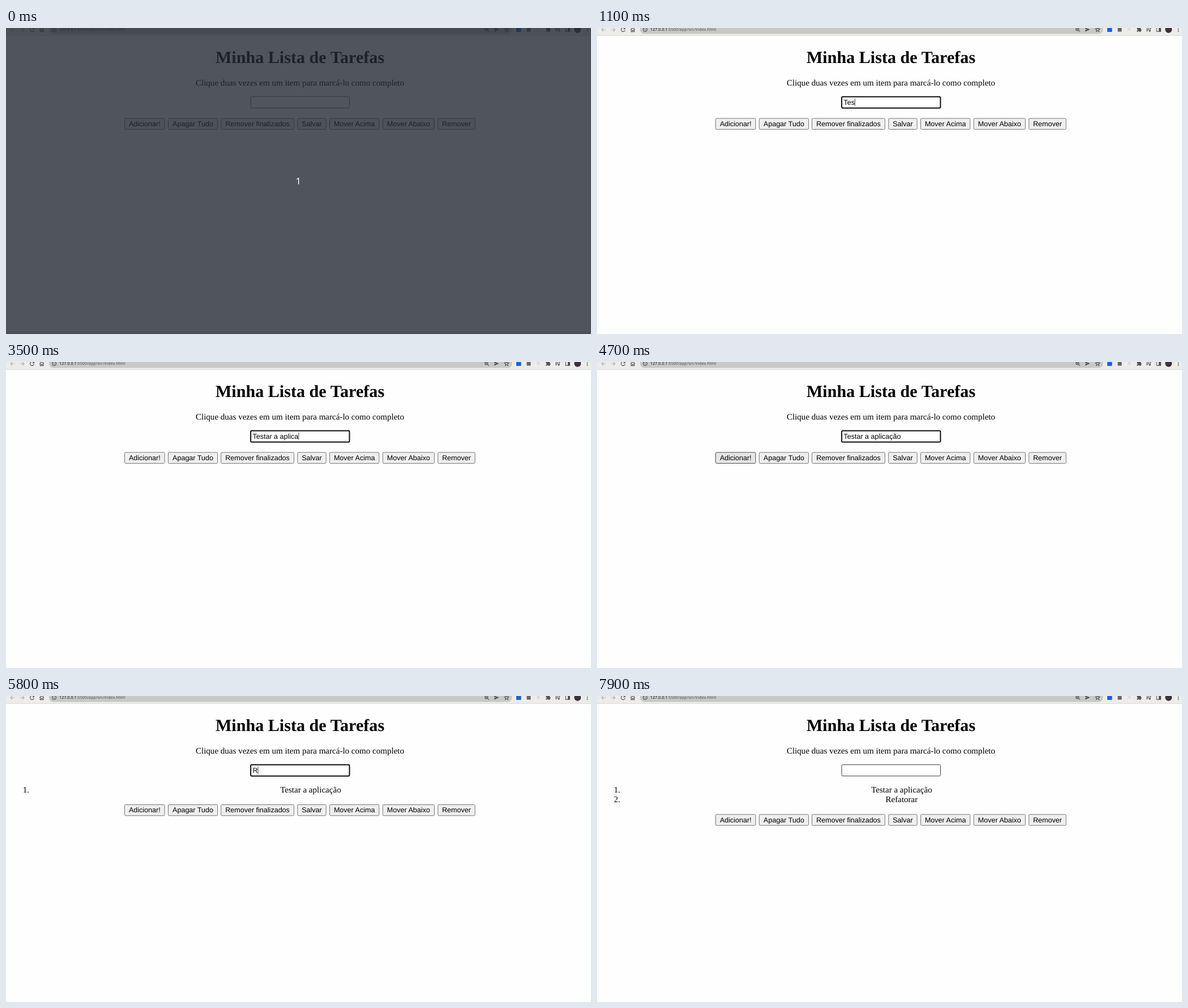
An HTML page for the animation above (8 s loop, 1033 by 542 pixels).

```html
<!DOCTYPE html>
<html lang="pt-BR">
<head>
<meta charset="utf-8">
<title>Minha Lista de Tarefas</title>
<style>
  html, body { margin: 0; width: 100%; height: 100%; overflow: hidden; background: #fefefe; }
  svg { display: block; }
  text { white-space: pre; text-rendering: geometricPrecision; }
  .serif { font: 15.065px "Liberation Serif", serif; }
  .title { font: bold 30.13px "Liberation Serif", serif; }
  .sans { font: 12.554px "Liberation Sans", sans-serif; }
  .url { font: 7.24px "Noto Sans", sans-serif; fill: #555; }
  .count { font: 16.5px "Noto Sans", sans-serif; fill: #fff; }
  .mid { text-anchor: middle; }
  .button rect { fill: #efefef; stroke: #767676; }
  .button.hover rect { fill: #e5e5e5; stroke: #4f4f4f; }
  .button.active rect { fill: #f5f5f5; stroke: #8d8d8d; }
  #field { fill: #fff; stroke: #767676; }
  #field.hover { stroke: #3c3c3c; }
  #field.focus { stroke: #101010; stroke-width: 2; }
  .icon { fill: none; stroke: #50524f; stroke-width: 1.1; }
  .pale { stroke: #b0b1ae; }
  .solid { fill: #50524f; stroke: none; }
</style>
</head>
<body>
<svg width="1033" height="542" viewBox="0 0 1033 542">
  <rect width="1033" height="542" fill="#fefefe"/>

  <g id="toolbar">
    <rect width="1033" height="13" fill="#ecedeb"/>
    <rect y="13" width="1033" height="1" fill="#dcdddb"/>
    <rect x="76" y="-10" width="817.5" height="20.5" rx="8" fill="#c7c9c5"/>
    <path class="icon pale" d="M15.5 3H8M11.5 -.5 8 3l3.5 3.5M24.5 3H32M28.5 -.5 32 3l-3.5 3.5"/>
    <path class="icon" d="M48.8 .7A3.5 3.5 0 1 0 49.4 4M49.5 -1V1.8H46.5"/>
    <path class="icon" d="M59.3 2.8 63.2 -.7l3.9 3.5M60.4 2V6.7h1.9V3.8h1.8v2.9H66V2"/>
    <circle class="icon" cx="85" cy="2.8" r="3.4" stroke-width=".8"/>
    <path class="icon" d="M85 2.2V4.8M85 .7V1.5" stroke-width=".9"/>
    <text class="url" x="94" y="5.4"><tspan fill="#1e1f1e">127.0.0.1</tspan>:5500/app/src/index.html</text>
    <circle class="icon" cx="848.3" cy="2.2" r="2.6" stroke-width=".9"/>
    <path class="icon" d="M850.2 4.1 853 6.9M847 2.2h2.6M848.3 .9v2.6" stroke-width=".9"/>
    <path class="solid" d="M862.3 -.8 870.5 2.8 862.3 6.4V3.6L867 2.8 862.3 2Z"/>
    <path class="icon" d="M884 -1 885.1 1.4 887.7 1.7 885.8 3.5 886.3 6.1 884 4.8 881.7 6.1 882.2 3.5 880.3 1.7 882.9 1.4Z" stroke-width=".9"/>
    <rect x="901" y="-2" width="8.6" height="9" rx="1" fill="#1b63d8"/>
    <rect x="919.5" y="-1" width="7" height="7.5" fill="#656765"/>
    <rect x="937.5" y="0" width="5" height="5" fill="#dddedc"/>
    <path class="solid" d="M953.5 0H956a1.3 1.3 0 0 1 2.6 0H960.4V2.2a1.3 1.3 0 0 1 0 2.6V6.8H957.8a1.2 1.2 0 0 0-2.4 0H953.5V4.6a1.2 1.2 0 0 0 0-2.4Z"/>
    <path class="icon" d="M970 .3h5.5M970 2.6h5.5M970 4.9h3M977 5V0h2"/>
    <circle class="solid" cx="976" cy="5.2" r="1.4"/>
    <rect class="icon" x="988.2" y="-.8" width="7.2" height="7"/>
    <rect class="solid" x="992" y="-.8" width="3.4" height="7"/>
    <circle cx="1009.3" cy="2.8" r="6" fill="#40303f"/>
    <g class="solid"><circle cx="1026.5" cy="0" r=".9"/><circle cx="1026.5" cy="3" r=".9"/><circle cx="1026.5" cy="6" r=".9"/></g>
  </g>

  <text class="title mid" x="519" y="61.8">Minha Lista de Tarefas</text>
  <text class="serif mid" x="519" y="102.3">Clique duas vezes em um item para marcá-lo como completo</text>
  <rect id="field" x="432.1" y="121.7" width="174.4" height="20" rx="2"/>
  <text id="typed" class="sans" x="435.4" y="135.6"></text>
  <rect id="caret" y="124.6" width=".7" height="13.2"/>
  <g id="list"></g>
  <g id="buttons"></g>

  <g id="countdown">
    <rect width="1033" height="542" fill="rgb(37,43,52)" fill-opacity=".8"/>
    <rect y="538" width="1033" height="4" fill="#000" fill-opacity=".06"/>
    <text class="count mid" x="516.3" y="276.9">1</text>
  </g>
</svg>
<script>
const LOOP = 8000;
const LINE = 17.3;
const LIST_GAP = 15.1;
const TASKS = ['Testar a aplicação', 'Refatorar'];
// label, left edge, right edge
const BUTTONS = [
  ['Adicionar!', 209.5, 280.1],
  ['Apagar Tudo', 286.4, 373.6],
  ['Remover finalizados', 379.6, 508.5],
  ['Salvar', 514.8, 565.2],
  ['Mover Acima', 571.5, 658.8],
  ['Mover Abaixo', 665.3, 756.4],
  ['Remover', 762.7, 828.2]
];

// Each step changes part of the state and holds until the next one.
const STEPS = [
  [0, { countdown: true, field: '', text: '', caret: false, button: '', tasks: 0 }],
  [100, { countdown: false, field: 'hover' }],
  [400, { field: 'focus', caret: true }],
  [700, { text: 'T' }],
  [900, { text: 'Te' }],
  ...typing(1100, 'Te', 'star a a'),
  [2000, { text: 'Testar a apl' }],
  [2200, { text: 'Testar a apli' }],
  [2300, { text: 'Testar a aplica' }],
  [2400, { text: 'Testar a aplica~' }],
  [2800, { text: 'Testar a ' }],
  ...typing(3000, 'Testar a ', 'aplicaç~'),
  [3800, { text: 'Testar a aplicaçã' }],
  [3900, { text: 'Testar a aplicação' }],
  [4600, { caret: false }],
  [4700, { button: 'hover' }],
  [5000, { button: 'active', field: '' }],
  [5100, { button: '', text: '', tasks: 1 }],
  [5400, { field: 'hover' }],
  [5600, { field: 'focus', caret: true }],
  [5800, { text: 'R' }],
  ...typing(6000, 'R', 'efat'),
  [6500, { text: 'Refato' }],
  [6600, { text: 'Refatora' }],
  [6700, { text: 'Refatorar' }],
  [7200, { button: 'hover' }],
  [7300, { caret: false }],
  [7500, { button: 'active', field: '' }],
  [7600, { button: '', text: '', tasks: 2 }],
  [7900, { field: 'hover' }]
];

function typing(start, before, added) {
  return [...added].map((_, i) => [start + i * 100, { text: before + added.slice(0, i + 1) }]);
}

const byId = id => document.getElementById(id);
const field = byId('field'), typed = byId('typed'), caret = byId('caret');
const list = byId('list'), buttons = byId('buttons'), countdown = byId('countdown');

function add(parent, tag, attrs, content = '') {
  const el = document.createElementNS(parent.namespaceURI, tag);
  for (const name in attrs) el.setAttribute(name, attrs[name]);
  el.textContent = content;
  return parent.appendChild(el);
}

for (const [label, left, right] of BUTTONS) {
  const group = add(buttons, 'g', { class: 'button' });
  add(group, 'rect', { x: left, y: 160.1, width: right - left, height: 19.4, rx: 1.8 });
  add(group, 'text', { class: 'sans mid', x: (left + right) / 2, y: 174 }, label);
}

TASKS.forEach((task, i) => {
  const item = add(list, 'g', {});
  const y = 171 + i * LINE;
  add(item, 'text', { class: 'serif', x: 29.8, y }, `${i + 1}.`);
  add(item, 'text', { class: 'serif mid', x: 537.9, y }, task);
});

const show = (el, on) => el.setAttribute('visibility', on ? 'visible' : 'hidden');

function render(state) {
  show(countdown, state.countdown);
  field.setAttribute('class', state.field);
  typed.textContent = state.text;
  const width = state.text ? typed.getComputedTextLength() : 0;
  caret.setAttribute('x', 435.6 + width);
  show(caret, state.caret && state.field === 'focus');
  [...list.children].forEach((item, i) => show(item, i < state.tasks));
  const shift = state.tasks ? LIST_GAP + state.tasks * LINE : 0;
  buttons.setAttribute('transform', `translate(0 ${shift})`);
  buttons.firstChild.setAttribute('class', `button ${state.button}`);
}

const start = performance.now();
let shown = 0;

function tick() {
  const time = Math.max(0, performance.now() - start) % LOOP;
  const past = STEPS.filter(([at]) => at <= time);
  if (past.length !== shown) {
    shown = past.length;
    render(Object.assign({}, ...past.map(([, change]) => change)));
  }
  requestAnimationFrame(tick);
}
tick();
</script>
</body>
</html>
```
